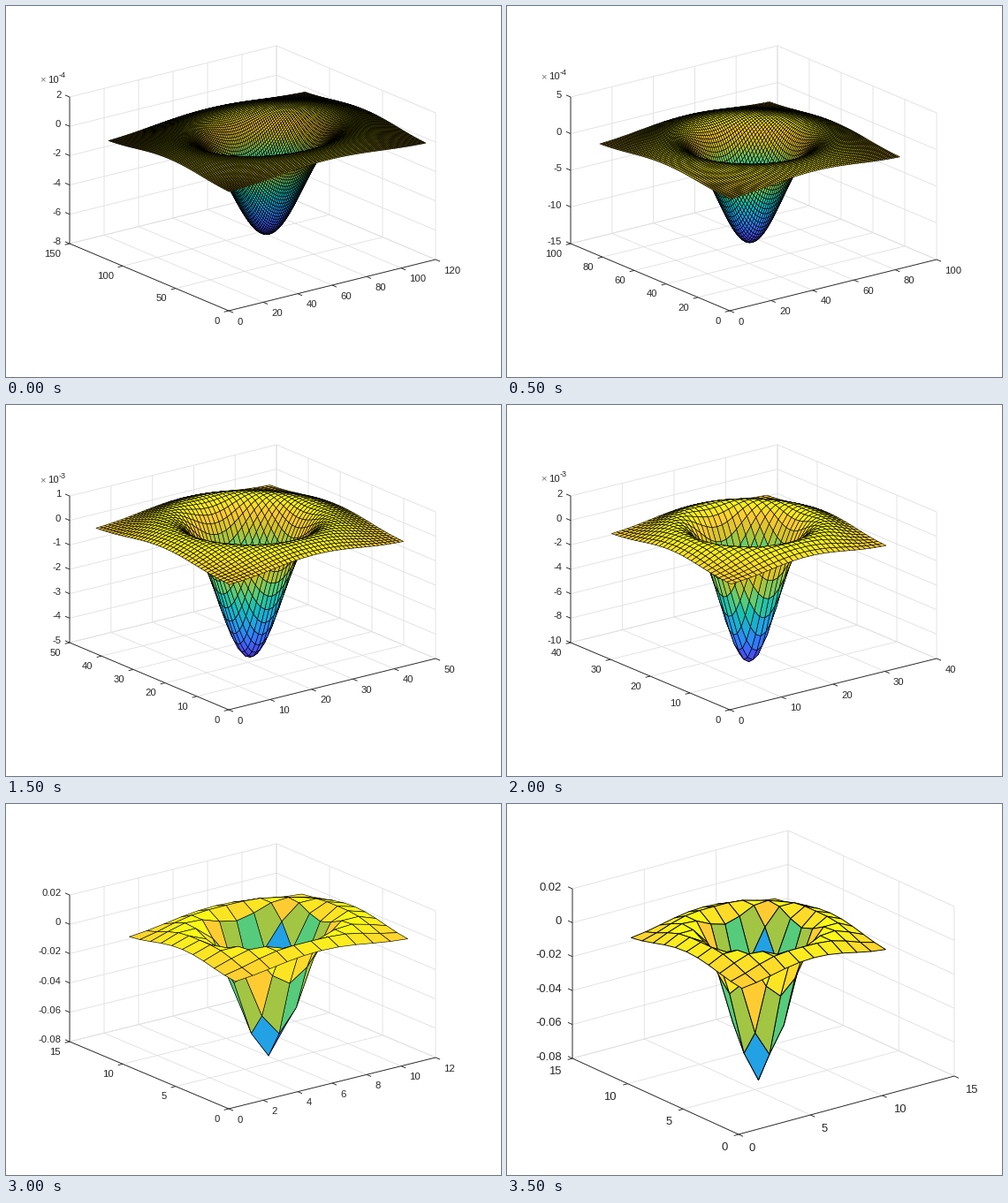
A matplotlib script for the animation above (4000 ms loop, 560 px wide and 420 px high).

```python
import math

import numpy as np
import matplotlib.pyplot as plt
from matplotlib.animation import FuncAnimation
from matplotlib.collections import LineCollection, PolyCollection
from matplotlib.colors import LinearSegmentedColormap

W, H, DPI = 560, 420, 100
PX = 72 / DPI
INK = "#262626"
GRID = "#e1e1e1"
CMAP = LinearSegmentedColormap.from_list("blue_yellow", [
    "#3e26a8", "#4852f4", "#337afd", "#21a4e3", "#12beb9",
    "#5ccc76", "#c8c129", "#fec934", "#f9fb15"])

# Front corner, axis vectors, font size, label offsets, most intervals on x
SMALL = dict(origin=(252, 345), x=(234, -58), y=(-180, -76), z=(0, -166),
             font=11.3, gap=9.5, drop=11.5, most=6, edge=0.6)
LARGE = dict(origin=(262, 374), x=(244, -66), y=(-188, -86), z=(0, -192),
             font=13, gap=12, drop=14, most=5, edge=0.9)

# Kernel widths in half octaves above 2; the last surface is shown again, larger
HALF_OCTAVES = [7, 6, 5, 4, 3, 2, 0]
STAGES = [(p, SMALL) for p in HALF_OCTAVES] + [(0, LARGE)]

fig = plt.figure(figsize=(W / DPI, H / DPI), dpi=DPI, facecolor="white")
ax = fig.add_axes([0, 0, 1, 1])


def kernel(sigma):
    """Scale-normalised Laplacian of Gaussian on a square grid."""
    n = 4 * math.ceil((5 * sigma - 3) / 4 - 1e-9) + 3
    r = np.arange(n) - n // 2
    q = (r[:, None] ** 2 + r[None, :] ** 2) / sigma ** 2
    return n, (q - 2) * np.exp(-q / 2) / (2 * math.pi * sigma ** 2)


def nice_ticks(lo, hi, most):
    """Evenly spaced round values that enclose lo..hi, and their step's lead digit."""
    unit = 10.0 ** (math.floor(math.log10(hi - lo)) - 1)
    while True:
        for lead in (1, 2, 5):
            step = lead * unit
            first, last = math.floor(lo / step), math.ceil(hi / step)
            if last - first <= most:
                return step * np.arange(first, last + 1), lead
        unit *= 10


def label(x, y, text, size, ha, color=INK):
    ax.text(x, y + 0.36 * size, text, fontsize=size * PX, ha=ha, va="baseline",
            color=color, family="Liberation Sans")


def lines(segments, color, width):
    ax.add_collection(LineCollection(segments, colors=color, linewidths=width * PX,
                                     capstyle="butt"))


def marks(values, unit=1):
    """Tick texts with their place along the axis from 0 to 1."""
    texts = [f"{round(v / unit, 4) + 0.0:g}" for v in values]
    return list(zip(texts, np.linspace(0, 1, len(values))))


def draw(k):
    ax.cla()
    ax.set_xlim(0, W)
    ax.set_ylim(H, 0)
    ax.axis("off")

    octave, view = STAGES[k]
    o, ex, ey, ez = (np.array(view[key], float) for key in ("origin", "x", "y", "z"))
    font, gap, drop = view["font"], view["gap"], view["drop"]

    def at(u, v, w):
        return o + u * ex + v * ey + w * ez

    n, h = kernel(2 * math.sqrt(2) ** octave)
    xs, _ = nice_ticks(0, n, view["most"])
    ys, _ = nice_ticks(0, n, 5)
    zs, lead = nice_ticks(h.min(), h.max(), 6)
    span = zs[-1] - zs[0]
    power = math.floor(math.log10(span / 2.8))
    if power > -3:
        power = 0
    xt, yt, zt = marks(xs), marks(ys), marks(zs, 10.0 ** power)

    # Floor and the two back walls
    grid = [[at(u, 0, 0), at(u, 1, 0), at(u, 1, 1)] for _, u in xt]
    grid += [[at(0, v, 0), at(1, v, 0), at(1, v, 1)] for _, v in yt]
    grid += [[at(0, 1, w), at(1, 1, w), at(1, 0, w)] for _, w in zt]
    lines(grid, GRID, 0.9)

    # Axes with outward ticks and their labels
    dx, dy = ex / np.hypot(*ex) * 5.5, ey / np.hypot(*ey) * 5.5
    edges = [[at(1, 0, 0), o, at(0, 1, 0), at(0, 1, 1)]]
    for text, u in xt:
        p = at(u, 0, 0)
        edges.append([p, p - dy])
        label(p[0] + gap, p[1] + drop, text, font, "left")
    for text, v in yt:
        p = at(0, v, 0)
        edges.append([p, p - dx])
        label(p[0] - gap - 0.7, p[1] + drop - 0.8, text, font, "right")
    for text, w in zt:
        p = at(0, 1, w)
        edges.append([p, p + dy])
        label(p[0] - gap - 0.2, p[1] - 3, text, font, "right")
    lines(edges, INK, 0.9)

    if power:
        y = 85 - 1.2 * lead
        label(38.5, y, "×", font, "left", "#777777")
        label(47, y, "10", font, "left")
        label(60, y - 4.5, str(power), 9, "left")

    # Quads run from the far corner to the near one, so nearer ones cover
    i = np.arange(1, n + 1)
    u, v = np.meshgrid(i / xs[-1], i / ys[-1])
    w = (h - zs[0]) / span
    p = at(u[..., None], v[..., None], w[..., None])
    quads = np.stack([p[:-1, :-1], p[:-1, 1:], p[1:, 1:], p[1:, :-1]], axis=2)
    quads = quads.reshape(-1, 4, 2)[::-1]
    shade = ((h - h.min()) / np.ptp(h))[:-1, :-1].ravel()[::-1]
    ax.add_collection(PolyCollection(quads, facecolors=CMAP(shade), edgecolors="black",
                                     linewidths=view["edge"] * PX, joinstyle="round",
                                     zorder=3))
    return []


anim = FuncAnimation(fig, draw, frames=len(STAGES), init_func=lambda: draw(0),
                     interval=500, repeat=True, repeat_delay=0, blit=False)
plt.show()
```
